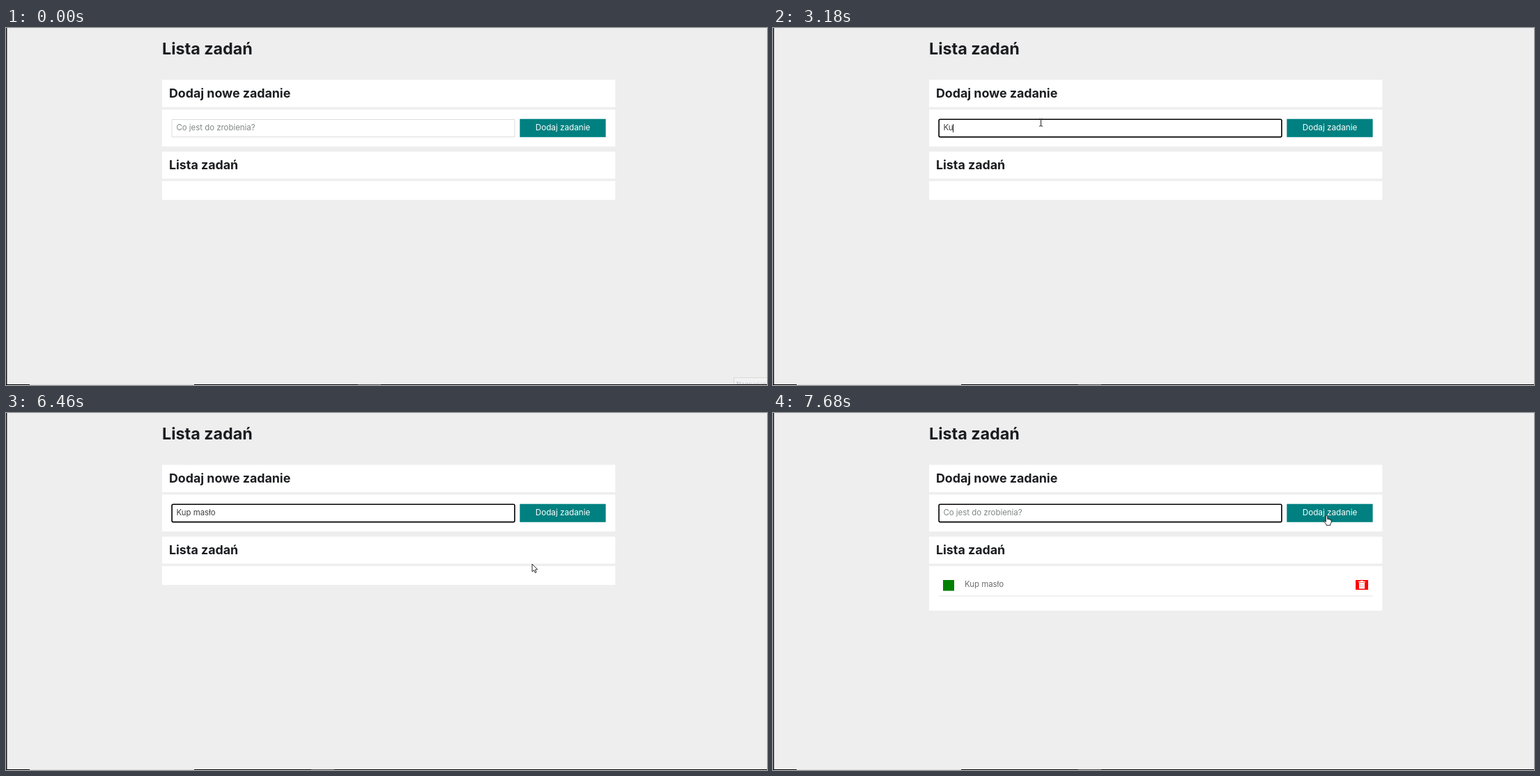
An HTML page with a canvas that plays this animation: 1092x513 px, repeating every 8000 ms.

```html
<!DOCTYPE html>
<html lang="pl">
<head>
<meta charset="utf-8">
<title>Lista zadań</title>
<style>
  html, body { margin: 0; width: 100%; height: 100%; overflow: hidden; background: #eee; }
  canvas { display: block; }
</style>
</head>
<body>
<canvas id="stage" width="1092" height="513"></canvas>
<script>
const ctx = document.getElementById('stage').getContext('2d');
const LOOP = 8000;
const STEP = 70;
const FAMILY = 'Montserrat, Inter, "Open Sans", sans-serif';
const BODY = `400 11.4px ${FAMILY}`;
const BUTTON = `400 11.7px ${FAMILY}`;
const H1 = `700 23.3px ${FAMILY}`;
const H2 = `700 17.8px ${FAMILY}`;
const INK = '#1b1d20';

const FOCUS = 1570, BLUR = 7020, ADDED = 7150;

// moment of each key press and the text it leaves in the field
const typing = [
  [2720, 'K'], [3180, 'Ku'], [3510, 'Kup'], [4510, 'Kup '], [4710, 'Kup m'],
  [4860, 'Kup ma'], [5060, 'Kup mas'], [5460, 'Kup masł'], [5660, 'Kup masło'],
  [ADDED, '']
];

// spans in which the text caret is hidden
const caretOff = [[0, FOCUS], [2120, 2650], [4040, 4510], [6250, ADDED], [7680, LOOP]];

// time, shape and hot spot of the pointer after it reaches the field
const pointer = [
  [1100, 'beam', 388, 150], [1640, 'beam', 387, 146], [1700, 'beam', 385, 139],
  [1770, 'beam', 384.5, 136], [6250, 'beam', 402, 141], [6320, 'arrow', 510, 171],
  [6390, 'arrow', 650, 206], [6460, 'arrow', 755, 217], [6530, 'arrow', 767, 222],
  [6600, 'arrow', 773, 213], [6670, 'arrow', 780, 192], [6740, 'arrow', 787, 168],
  [6810, 'hand', 792, 149], [7350, 'hand', 794.5, 147.5]
];

const lastBefore = (list, t) => list.filter(item => item[0] <= t).pop();
const within = (t, from, to) => t >= from && t < to;

function box(x, y, w, h, color) {
  ctx.fillStyle = color;
  ctx.fillRect(x, y, w, h);
}

function text(str, x, y, font, color) {
  ctx.font = font;
  ctx.fillStyle = color;
  ctx.fillText(str, x, y);
}

function outline(points, x, y) {
  ctx.beginPath();
  points.forEach(([px, py]) => ctx.lineTo(x + px, y + py));
  ctx.closePath();
  ctx.fillStyle = '#fff';
  ctx.fill();
  ctx.strokeStyle = '#111';
  ctx.lineWidth = 0.9;
  ctx.lineJoin = 'round';
  ctx.stroke();
}

const shapes = {
  beam(x, y) {
    box(x - 0.5, y - 5, 1, 10, '#222');
    for (const end of [y - 5.5, y + 4.5]) {
      box(x - 2.5, end, 2, 1, '#222');
      box(x + 0.5, end, 2, 1, '#222');
    }
  },
  arrow(x, y) {
    outline([[0, 0], [0, 11], [2.5, 8.8], [4.2, 12.6], [6, 11.8], [4.4, 8.1], [7.6, 7.8]], x, y);
  },
  hand(x, y) {
    outline([[-1.2, 1], [0, 0], [1.2, 1], [1.2, 5], [3, 4.6], [3.4, 5.5], [5, 5.2],
      [5.4, 6.2], [6.6, 6.2], [6.8, 9.5], [5.4, 12], [5.4, 13.8], [-0.5, 13.8],
      [-1, 12], [-4, 8.2], [-3.2, 7.4], [-1.2, 8.8]], x, y);
  }
};

function pointerAt(t) {
  if (t < 330) return null;
  if (t >= 1100) return lastBefore(pointer, t).slice(1);
  const u = (Math.floor((t - 330) / STEP) + 1) / 12;
  const rest = (1 - u) ** 2;
  return ['arrow', 388 + 567 * rest, 150 + 355 * rest];
}

function drawEdges(t) {
  box(0, 0, 1.4, 513, '#111');
  if (t < 70) {
    box(1044, 502, 48, 11, '#d8d8d8');
    box(1045, 503, 47, 10, '#f2f2f2');
    text('Nagrywanie', 1048, 515, `400 9px ${FAMILY}`, '#aeb9bf');
  }
  box(0, 512, 1092, 1, '#000');
  box(34, 512, 236, 1, '#ddd');
  if (t < 540) box(505, 512, 33, 1, '#484848');
  if (t >= 1700) box(438, 512, 33, 1, '#484848');
}

function drawField(t) {
  const focused = within(t, FOCUS, BLUR) || t >= ADDED;
  ctx.beginPath();
  if (focused) {
    ctx.roundRect(238.1, 131.2, 491.8, 25.4, 1.8);
    ctx.strokeStyle = '#000';
    ctx.lineWidth = 1.6;
  } else {
    ctx.rect(238, 131.5, 492, 25);
    ctx.strokeStyle = '#ddd';
    ctx.lineWidth = 1;
  }
  ctx.stroke();

  const typed = (lastBefore(typing, t) || [0, ''])[1];
  if (typed) text(typed, 244.5, 147.3, BODY, '#404040');
  else text('Co jest do zrobienia?', 244.5, 147.3, BODY, '#7f8783');

  if (!caretOff.some(([from, to]) => within(t, from, to))) {
    ctx.font = BODY;
    box(Math.round(244.3 + ctx.measureText(typed).width), 138, 1, 12, '#222');
  }
}

function drawTask() {
  box(244, 240, 16, 15.5, '#008000');
  text('Kup masło', 275, 250.2, BODY, '#6e6e6e');
  box(238, 262.5, 623, 1, '#e4e4e4');
  box(836, 240, 18, 14, '#f00');
  box(840, 242, 10, 1.4, '#fff');
  box(843, 241, 4, 1, '#fff');
  box(841, 244, 8, 8.5, '#fff');
  [842.4, 844.6, 846.8].forEach(x => box(x, 245.5, 0.8, 5.5, '#f3a09a'));
}

function draw(t) {
  const done = t >= ADDED;
  box(0, 0, 1092, 513, '#eee');
  drawEdges(t);

  text('Lista zadań', 224, 38, H1, INK);
  box(224, 74.5, 650.3, 39.2, '#fff');
  box(224, 117.2, 650.3, 53, '#fff');
  box(224, 177.7, 650.3, 38.8, '#fff');
  box(224, 220, 650.3, done ? 64 : 27, '#fff');
  text('Dodaj nowe zadanie', 234, 100.3, H2, INK);
  text('Lista zadań', 234, 203, H2, INK);

  drawField(t);
  box(737.3, 130.7, 123.3, 26.1, '#008080');
  ctx.textAlign = 'center';
  text('Dodaj zadanie', 799, 147.3, BUTTON, '#fff');
  ctx.textAlign = 'left';
  if (done) drawTask();

  const mouse = pointerAt(t);
  if (!mouse) return;
  const [shape, x, y] = mouse;
  if (within(t, FOCUS, 1700) || within(t, BLUR, ADDED)) {
    ctx.beginPath();
    ctx.arc(x - 1.5, y - 1, 8, 0, Math.PI * 2);
    ctx.fillStyle = 'rgba(255, 245, 0, 0.55)';
    ctx.fill();
  }
  shapes[shape](x, y);
}

const start = performance.now();
function tick() {
  draw((performance.now() - start) % LOOP);
  requestAnimationFrame(tick);
}
tick();
</script>
</body>
</html>
```
